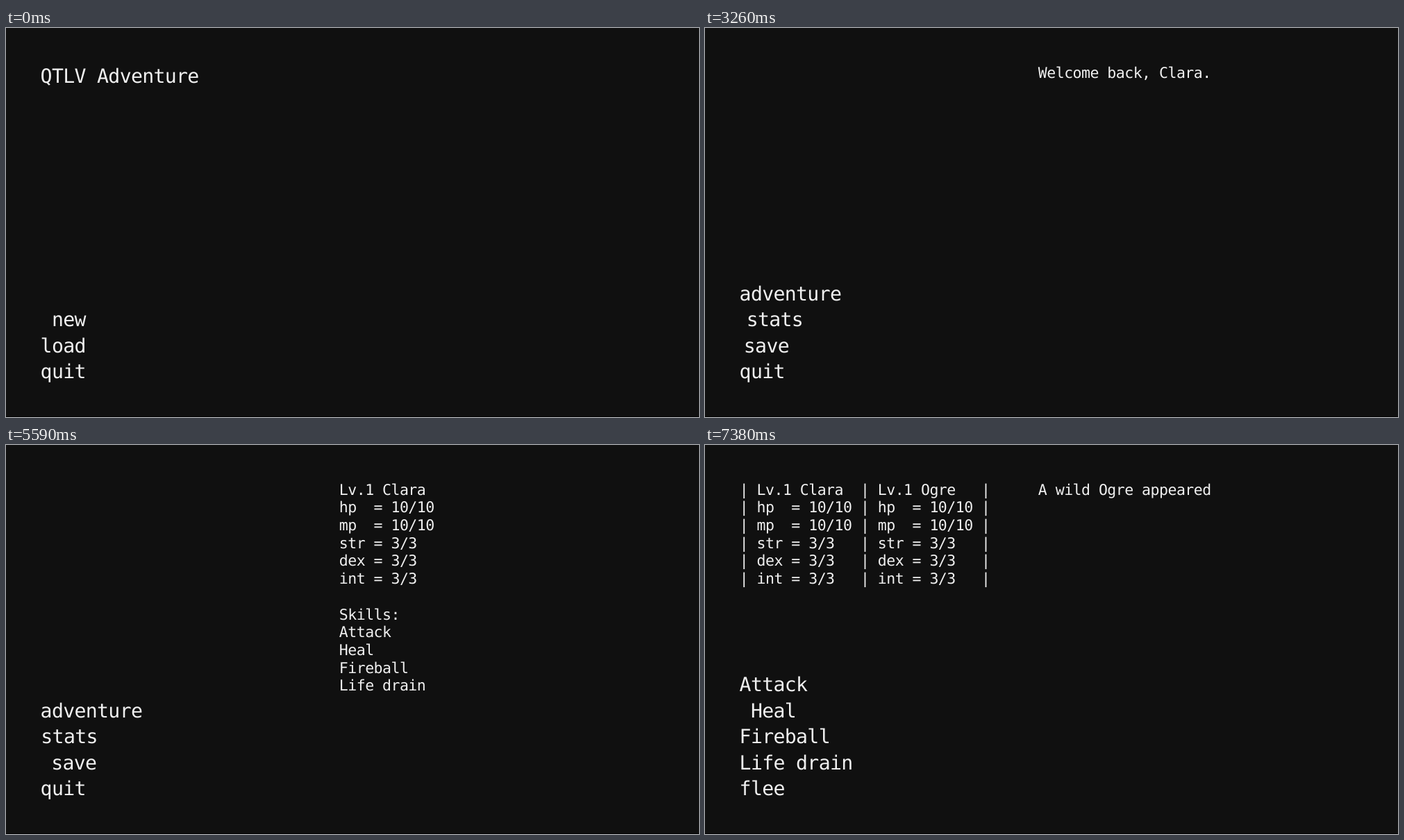
Write an HTML page that moves like this. It is 998 px wide and 561 px high and loops after 8000 ms.

```html
<!DOCTYPE html>
<html lang="en">
<head>
<meta charset="utf-8">
<title>Text adventure menu</title>
<style>
html, body { margin: 0; width: 100%; height: 100%; overflow: hidden; background: #101010; }
svg { display: block; width: 998px; height: 561px; }
text {
  fill: #f0f0f0; font-family: "DejaVu Sans Mono", monospace;
  white-space: pre; text-rendering: geometricPrecision;
}
.big { font-size: 28.2px; letter-spacing: -0.68px; }
.small { font-size: 21.54px; letter-spacing: -0.52px; }
</style>
</head>
<body>
<svg id="stage" viewBox="0 0 998 561">
  <rect width="998" height="561" fill="#101010"/>
  <rect y="560" width="998" height="1" fill="#000"/>
</svg>
<script>
const LOOP = 8000, STEP = 75, EASE = 200, INDENT = 16.3;
const LEFT = 49.6, RIGHT = 479.8;
const hero = "Clara";
const stage = document.getElementById("stage");

const stats = ["hp  = 10/10", "mp  = 10/10", "str = 3/3", "dex = 3/3", "int = 3/3"];
const skills = ["Attack", "Heal", "Fireball", "Life drain"];
const cell = s => "| " + s.padEnd(12);
const duel = ["Lv.1 " + hero, ...stats].map((s, i) =>
  cell(s) + cell(i ? s : "Lv.1 Ogre") + "|");

const startMenu = ["new", "load", "quit"];
const gameMenu = ["adventure", "stats", "save", "quit"];
const screens = [
  { at: 0, menu: startMenu, title: "QTLV Adventure", left: [], right: [] },
  { at: 2020, menu: gameMenu, title: "", left: [], right: [`Welcome back, ${hero}.`] },
  { at: 4510, menu: gameMenu, title: "", left: [],
    right: ["Lv.1 " + hero, ...stats, "", "Skills:", ...skills] },
  { at: 6220, menu: gameMenu, title: "", left: [], right: ["Save success!"] },
  { at: 7310, menu: [...skills, "flee"], title: "", left: duel, right: ["A wild Ogre appeared"] }
];

// Cursor moves; rows count upward from the bottom of the menu.
const move = (at, row, lead = 55) => ({ at, row, lead });
const confirm = (at, row, lead = 55) => ({ at, row, lead, reset: true });
const moves = [
  move(-1000, 2),
  move(610, 1, 115), move(1320, 2), move(1700, 1), confirm(2020, 1),
  move(3260, 2), move(3410, 3), move(3810, 2), move(3890, 1),
  move(4190, 2), confirm(4510, 2), move(5520, 1), confirm(6220, 1, 48),
  move(6770, 2), move(6925, 3), confirm(7310, 3, 115)
];

function addText(cls, x, y) {
  const el = document.createElementNS("http://www.w3.org/2000/svg", "text");
  el.setAttribute("class", cls);
  el.setAttribute("x", x);
  el.setAttribute("y", y);
  return stage.appendChild(el);
}

const list = (n, make) => Array.from({ length: n }, (_, i) => make(i));
const lineY = i => 71.5 + 25.72 * i;
const title = addText("big", LEFT, 78.8);
const rows = list(5, i => addText("big", LEFT, 505 - 37.4 * i));
const leftLines = list(6, i => addText("small", LEFT + 0.1, lineY(i)));
const rightLines = list(12, i => addText("small", RIGHT, lineY(i)));

function progress(age, lead) {
  const shown = lead + STEP * Math.floor((age + 5) / STEP);
  return 1 - (1 - Math.min(1, shown / EASE)) ** 3;
}

function indents(time) {
  let cur = [0, 0, 0, 0, 0];
  moves.forEach((m, i) => {
    if (m.at > time) return;
    const next = moves[i + 1];
    const end = next ? Math.min(time, next.at) : time;
    const p = progress(end - m.at, m.lead);
    cur = cur.map((v, row) => {
      const from = m.reset ? 0 : v;
      return from + ((row === m.row ? INDENT : 0) - from) * p;
    });
  });
  return cur;
}

function fill(els, lines) {
  els.forEach((el, i) => { el.textContent = lines[i] || ""; });
}

let current;
function draw(time) {
  const screen = screens.filter(s => s.at <= time).pop();
  if (screen !== current) {
    current = screen;
    title.textContent = screen.title;
    fill(rows, [...screen.menu].reverse());
    fill(leftLines, screen.left);
    fill(rightLines, screen.right);
  }
  indents(time).forEach((dx, i) => rows[i].setAttribute("x", LEFT + dx));
}

const begin = performance.now();
function tick() {
  draw((performance.now() - begin) % LOOP);
  requestAnimationFrame(tick);
}
tick();
</script>
</body>
</html>
```
